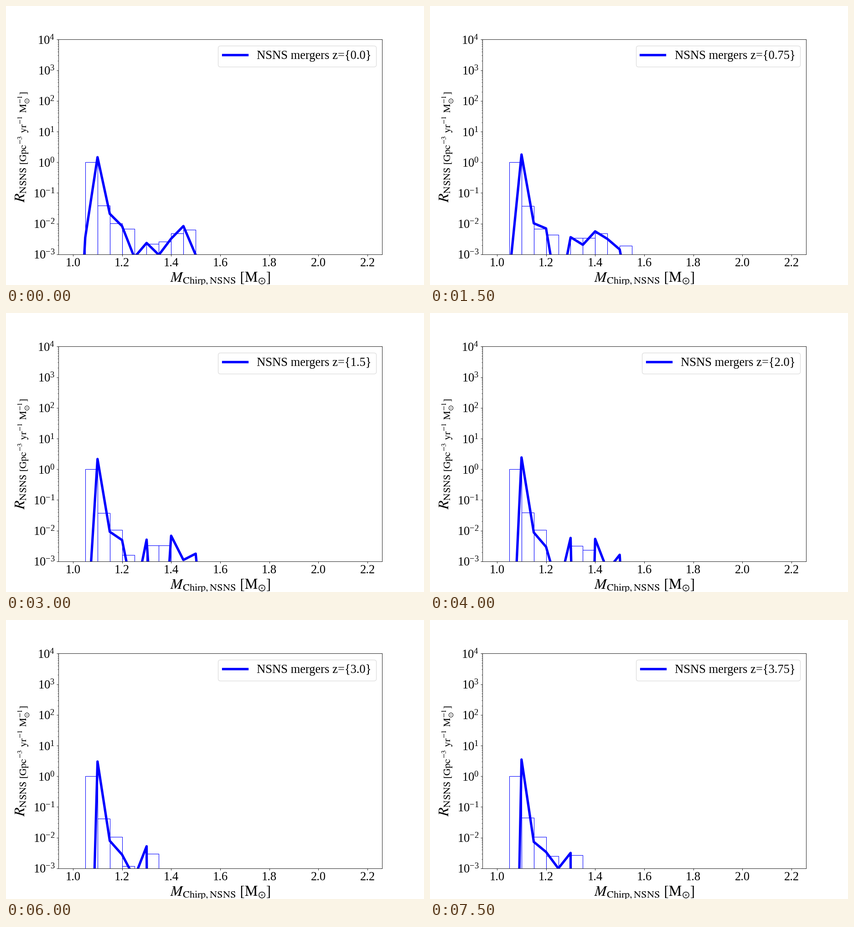
Write a matplotlib script that moves like this. It is 917 px wide and 611 px high and loops after 8000 ms.

```python
import numpy as np
import matplotlib.pyplot as plt
from matplotlib.animation import FuncAnimation

W, H, DPI = 917, 611, 100
S = 0.764  # point scale of a 12 x 8 inch layout on this stage
FRAMES, INTERVAL, Z_STEP = 16, 500, 0.25
BIN, FLOOR = 0.05, 1e-6

plt.rcParams.update({
    "font.family": "Liberation Serif",
    "mathtext.fontset": "stix",
    "font.size": 25 * S,
    "axes.linewidth": 0.8 * S,
    "axes.labelpad": 4 * S,
    "patch.linewidth": 1.0 * S,
})
for axis in ("xtick", "ytick"):
    for kind, size, width in (("major", 3.5, 0.8), ("minor", 2, 0.6)):
        plt.rcParams[f"{axis}.{kind}.size"] = size * S
        plt.rcParams[f"{axis}.{kind}.width"] = width * S
        plt.rcParams[f"{axis}.{kind}.pad"] = 3.5 * S


def well(z, center, width):
    return np.exp(-((z - center) / width) ** 2)


def cubic(z, start, rise, fall):
    return start + rise * z - fall * z**3


def curve(z):
    """Merger rate at masses 1.00, 1.05, ... as it drifts with redshift."""
    return 10 ** np.array([
        -9.6 - 8 * z,
        -2.45 - 0.94 * z - 0.98 * z**2,
        0.165 + 0.12 * z - 0.005 * z**2,
        -1.97 - 0.045 * z + 0.29 * np.exp(-4 * z),
        -2.08 - 0.1 * z - 0.33 * well(z, 2.4, 0.75),
        -3.1 + 0.1 * z - 4.6 * z * np.exp(-1.1 * z),
        cubic(z, -2.63, 0.26, 0.016),
        cubic(z, -3.02, 1.74, 2.31),
        cubic(z, -2.49, 0.35, 0.06),
        cubic(z, -2.08, -0.55, 0.015),
        cubic(z, -3.02, 0.26, 0.036),
        cubic(z, -4.0, -1.0, 0.4),
    ])


def bar_tops(z):
    """Histogram heights for the bins that start at 1.05, 1.10, ..."""
    return 10 ** np.array([
        0.0,
        -1.425 + 0.01 * (z - 1) ** 2,
        -1.98 - 0.2 * well(z, 0.7, 0.4),
        -2.14 - 0.08 * z - 0.8 * well(z, 2.25, 1.2),
        -4.0,
        -2.46 - 0.2 * np.exp(-4 * z) - 0.008 * z**2,
        cubic(z, -2.59, 0.19, 0.052),
        cubic(z, -2.318, 0.17, 0.3),
        -2.207 - 1.2 * z,
        -2.72 - 1.2 * (z - 0.75) ** 2,
    ])


def legend_text(z):
    return f"NSNS mergers z={{{z}}}"


fig = plt.figure(figsize=(W / DPI, H / DPI), dpi=DPI, facecolor="white")
ax = fig.add_axes([0.125, 0.11, 0.775, 0.77])
ax.set_yscale("log")

tops, rates = bar_tops(0.0), curve(0.0)
bars = ax.bar(1.05 + BIN * np.arange(len(tops)), tops - FLOOR, width=BIN,
              bottom=FLOOR, align="edge", fill=False, edgecolor="blue",
              linewidth=1.0 * S)
(line,) = ax.plot(1.0 + BIN * np.arange(len(rates)), rates, color="blue",
                  lw=5 * S, label=legend_text(0.0))

ax.set_xlim(0.94, 2.26)
ax.set_ylim(1e-3, 1e4)
x_ticks = np.arange(1.0, 2.3, 0.2)
ax.set_xticks(x_ticks, [f"{x:.1f}" for x in x_ticks])
ax.set_xlabel(r"$M_{\mathrm{Chirp, NSNS}}~[\mathrm{M}_{\odot}]$", fontsize=30 * S)
ax.set_ylabel(r"$R_{\mathrm{NSNS~[Gpc^{-3}~yr^{-1}~M_{\odot}^{-1}]}}$", fontsize=30 * S)
label = ax.legend(loc="upper right").get_texts()[0]


def update(i):
    z = i * Z_STEP
    line.set_ydata(curve(z))
    for bar, top in zip(bars, bar_tops(z)):
        bar.set_height(top - FLOOR)
    label.set_text(legend_text(z))
    return [line, label, *bars]


anim = FuncAnimation(fig, update, frames=FRAMES, interval=INTERVAL,
                     repeat=True, repeat_delay=0, blit=False)
plt.show()
```
